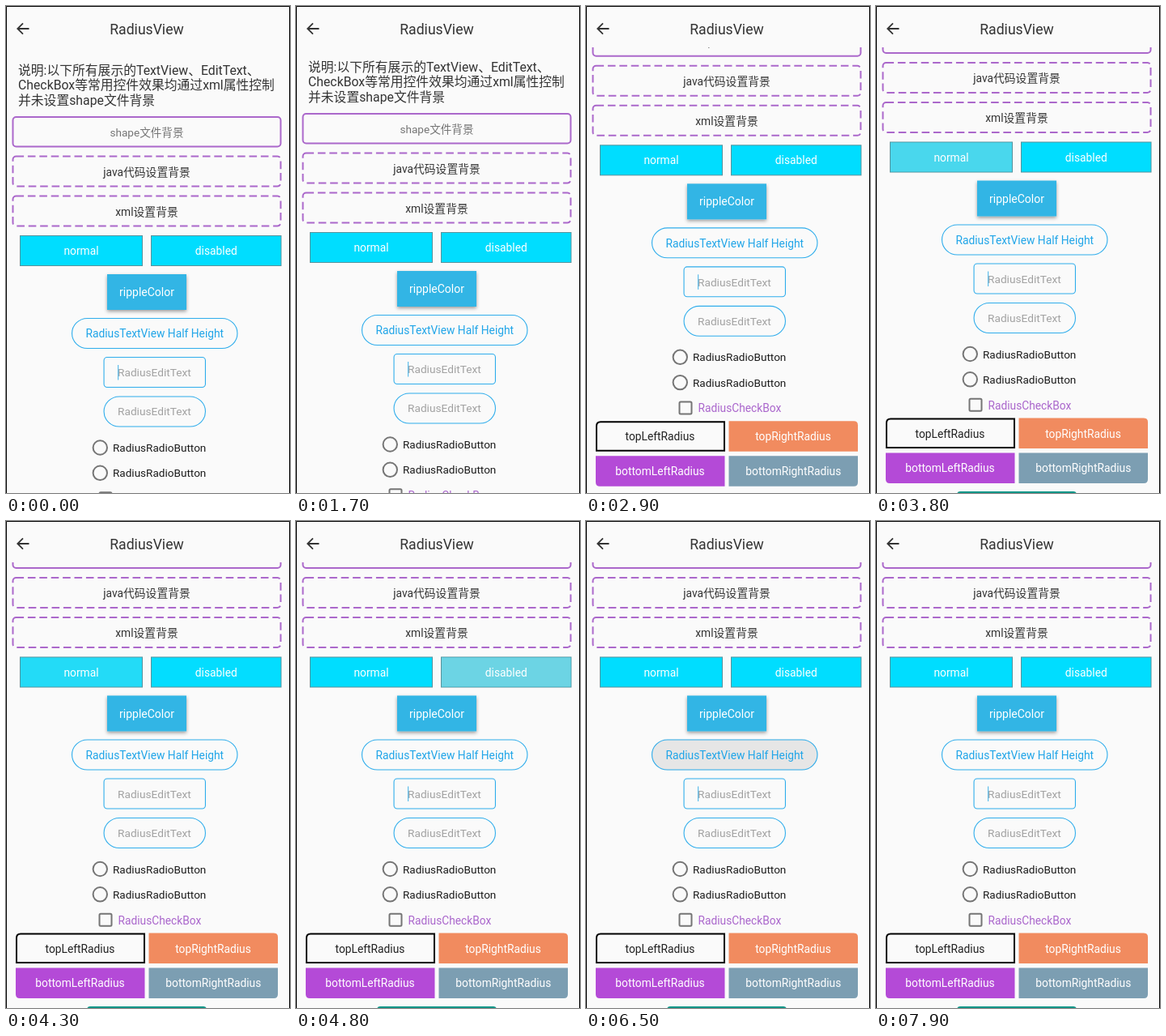
Recreate the animation shown at these times as an HTML page. Size 351x601 px, loop 8 s.

```html
<!DOCTYPE html>
<html lang="zh">
<head>
<meta charset="utf-8">
<title>RadiusView</title>
<style>
html, body { margin: 0; width: 100%; height: 100%; overflow: hidden; background: #fafafa; }
svg { display: block; }
text { font-family: Roboto, "Noto Sans CJK SC", "Noto Sans CJK", sans-serif; white-space: pre; }
</style>
</head>
<body>
<svg id="stage" width="351" height="601" viewBox="0 0 351 601">
  <defs>
    <clipPath id="view"><rect x="0" y="51" width="351" height="550"/></clipPath>
    <filter id="shadow" x="-20%" y="-30%" width="140%" height="170%">
      <feDropShadow dx="0" dy="2" stdDeviation="2.2" flood-color="#000" flood-opacity=".38"/>
    </filter>
  </defs>
  <rect width="351" height="601" fill="#fafafa"/>
  <g clip-path="url(#view)"><g id="page"></g></g>
  <g id="bar"></g>
  <path d="M.5 601V.5H350.5V601" fill="none" stroke="#000"/>
</svg>
<script>
const NS = 'http://www.w3.org/2000/svg';
const page = document.getElementById('page');
const bar = document.getElementById('bar');

function add(parent, tag, attrs, content) {
  const el = document.createElementNS(NS, tag);
  for (const key in attrs) el.setAttribute(key, attrs[key]);
  if (content) el.textContent = content;
  parent.appendChild(el);
  return el;
}

function label(parent, content, x, y, fill, size = 13.8, anchor = 'middle') {
  return add(parent, 'text', { x, y, fill, 'font-size': size, 'text-anchor': anchor }, content);
}

// Box given by its outer edges; the stroke lies inside.
function box(x1, y1, x2, y2, style = {}) {
  const s = style.stroke ? style['stroke-width'] || 1 : 0;
  return add(page, 'rect', {
    x: x1 + s / 2, y: y1 + s / 2, width: x2 - x1 - s, height: y2 - y1 - s,
    fill: 'none', ...style
  });
}

// Title bar
add(bar, 'path', {
  d: 'M28.5 28H14.5M21 21.3L14.3 28L21 34.7', fill: 'none', stroke: '#333', 'stroke-width': 1.8
});
label(bar, 'RadiusView', 174, 34.5, '#333', 17.6);

// Introduction
[
  '说明:以下所有展示的TextView、EditText、',
  'CheckBox等常用控件效果均通过xml属性控制',
  '并未设置shape文件背景'
].forEach((line, i) => label(page, line, 15, 85 + i * 18.4, '#333', 15.8, 'start'));

// Outlined boxes
const purple = { stroke: '#ab68cb', 'stroke-width': 2, rx: 4 };
const dashed = { ...purple, 'stroke-dasharray': '9.6 4.8' };
box(7.5, 136, 340.5, 174.5, purple);
label(page, 'shape文件背景', 174, 160.5, '#757575', 13.6);
box(7.5, 184.5, 340.5, 223.5, dashed);
label(page, 'java代码设置背景', 174, 209.5, '#333');
box(7.5, 233.5, 340.5, 272.5, dashed);
label(page, 'xml设置背景', 174, 258.5, '#333');

// Filled buttons, each with a tint that fades in and out on a press
const cyan = { fill: '#00ddff', stroke: '#57929c' };
box(17, 283, 169, 321, cyan);
const tintNormal = box(18, 284, 168, 320, { fill: '#ccc' });
label(page, 'normal', 93, 307, '#fff');

box(179, 283, 340.5, 321, cyan);
const tintDisabled = box(180, 284, 339.5, 320, { fill: '#ccc' });
label(page, 'disabled', 259.8, 307, '#fff');

box(125, 331, 223, 375, { fill: '#33b5e5', filter: 'url(#shadow)' });
const tintRipple = box(125, 331, 223, 375, { fill: '#aa66cc' });
label(page, 'rippleColor', 174, 358, '#fff', 14);

const blue = { stroke: '#2fadec', 'stroke-width': 1.1 };
const tintPill = box(81, 385, 286.5, 423, { fill: '#ccc', rx: 19 });
box(81, 385, 286.5, 423, { ...blue, rx: 19 });
label(page, 'RadiusTextView Half Height', 183.8, 409.3, '#20a5e8');

// Text fields
box(120.5, 433, 247, 471, { ...blue, rx: 4 });
label(page, 'RadiusEditText', 138, 457.3, '#a2a2a2', 13.7, 'start');
const cursor = add(page, 'rect', { x: 138, y: 443, width: 1.2, height: 18.5, fill: '#5fbdec' });
box(120.5, 481.5, 247, 519.5, { ...blue, rx: 19 });
label(page, 'RadiusEditText', 138, 505.3, '#a2a2a2', 13.7, 'start');

// Radio buttons and check box
for (const y of [545, 576.3]) {
  add(page, 'circle', { cx: 116.3, cy: y, r: 8.7, fill: 'none', stroke: '#757575', 'stroke-width': 2 });
  label(page, 'RadiusRadioButton', 132, y + 5, '#1c1c1c', 13.55, 'start');
}
box(114.5, 599.3, 131.5, 616.3, { stroke: '#757575', 'stroke-width': 2, rx: 1.5 });
label(page, 'RadiusCheckBox', 138.5, 613, '#aa66cc', 13.75, 'start');

// Blocks with a single rounded corner
function block(d, style, name, x, y, color) {
  add(page, 'path', { d, ...style });
  label(page, name, x, y, color);
}
block('M13 660.5V630Q13 625 18 625H171V660.5Z', { fill: 'none', stroke: '#000', 'stroke-width': 2 },
  'topLeftRadius', 91.5, 648, '#222');
block('M176.5 624H331Q336 624 336 629V661.5H176.5Z', { fill: '#f18b5f' },
  'topRightRadius', 256, 648, '#fff');
block('M12 667H171.5V704.5H17Q12 704.5 12 699.5Z', { fill: '#b44ad7' },
  'bottomLeftRadius', 91.5, 690.8, '#fff');
block('M176.5 667H336V699.5Q336 704.5 331 704.5H176.5Z', { fill: '#7c9eb2' },
  'bottomRightRadius', 256.3, 690.8, '#fff');
box(100, 714.6, 248, 752, { fill: '#0f9587', rx: 4 });

const LOOP = 8000, STEP = 100;
const blinks = [300, 800, 1200, 1700, 2200, 2700, 3100, 3600, 4100, 4500, 5000,
  5500, 6000, 6400, 6900, 7200, 7700, 7900];

const clamp = v => Math.max(0, Math.min(1, v));
const smooth = v => { v = clamp(v); return v * v * (3 - 2 * v); };

function scrollAt(t) {
  return 4 * clamp((t - 1000) / 200) + 111.5 * smooth((t - 2100) / 900);
}

// Rises from start to peak time, then falls until end.
function press(t, start, top, end, alpha) {
  return alpha * smooth(t < top ? (t - start) / (top - start) : (end - t) / (end - top));
}

function draw(now) {
  const t = Math.floor((now % LOOP) / STEP) * STEP;
  page.setAttribute('transform', `translate(0 ${-scrollAt(t)})`);
  cursor.setAttribute('opacity', blinks.filter(b => b <= t).length % 2 ? 0 : 1);
  tintNormal.setAttribute('opacity', press(t, 3300, 4130, 4400, 0.55));
  tintDisabled.setAttribute('opacity', press(t, 4250, 4850, 5300, 0.54));
  tintRipple.setAttribute('opacity', press(t, 5100, 5550, 6200, 0.65));
  tintPill.setAttribute('opacity', press(t, 6100, 6600, 7200, 0.5));
}

const begin = performance.now();
function tick() {
  draw(performance.now() - begin);
  requestAnimationFrame(tick);
}
tick();
</script>
</body>
</html>
```
